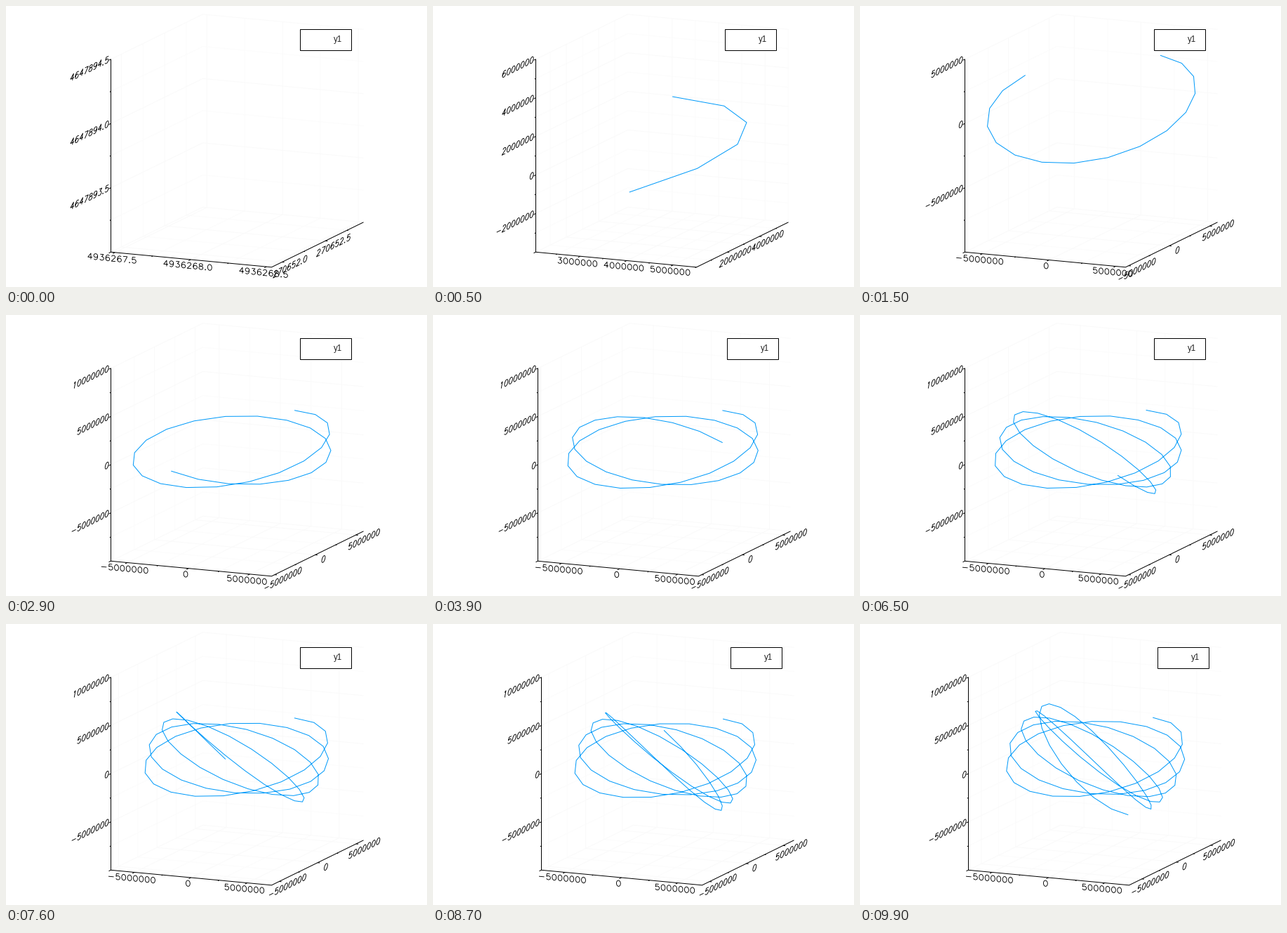
These frames come from a looping animation (600 px wide and 400 px high, 10 s). A matplotlib script:

```python
import numpy as np
import matplotlib.pyplot as plt
from matplotlib.animation import FuncAnimation
from matplotlib.collections import LineCollection
from matplotlib.patches import Rectangle

N = 100            # one more orbit sample per frame
STEP = 300         # seconds between samples
PX = 0.72          # one pixel in points at 100 dpi

# Circular orbit seen from the rotating Earth
START = np.array([4936268.004, 270652.41, 4647893.75])
INC = np.radians(51.64)
MOTION = np.radians(0.06461)                 # along the orbit, per second
DRIFT = np.radians(0.0041781 + 0.0000573)    # Earth spin plus node precession


def orbit():
    r = np.linalg.norm(START)
    t = np.arange(N) * STEP
    u = np.pi - np.arcsin(START[2] / (r * np.sin(INC))) + MOTION * t
    a, b = np.cos(u), np.sin(u) * np.cos(INC)
    node = np.arctan2(START[1], START[0]) - np.arctan2(b[0], a[0])
    lon = np.arctan2(b, a) + node - DRIFT * t
    rho = r * np.hypot(a, b)
    return np.column_stack([rho * np.cos(lon), rho * np.sin(lon),
                            r * np.sin(u) * np.sin(INC)])


PATH = orbit()

# Affine view of the unit cube, in pixels
ORIGIN = np.array([149, 349.8])
VIEW = np.array([[229, 21.5], [131, -64], [0, -274.5]])


# Stroke font on a 20 x 21 cell
def arc(cx, cy, rx, ry, a0, a1):
    a = np.radians(np.linspace(a0, a1, 20))
    return np.column_stack([cx + rx * np.cos(a), cy + ry * np.sin(a)])


def join(*parts):
    return np.vstack([np.atleast_2d(p) for p in parts]).astype(float)


SIX = join(arc(11.5, 10, 7.5, 11, 50, 180), arc(10.5, 6.5, 6.5, 6.5, 180, 540))
GLYPHS = {
    "0": [arc(10, 10.5, 7, 10.5, 0, 360)],
    "1": [join([(6, 17), (8, 18), (11, 21), (11, 0)])],
    "2": [join(arc(10, 15.5, 6, 5.5, 170, -25), [(3, 0), (17, 0)])],
    "3": [join([(5, 21), (16, 21), (10, 13)], arc(10, 6.5, 7, 6.5, 90, -155))],
    "4": [join([(13, 0), (13, 21), (3, 7), (18, 7)])],
    "5": [join([(15, 21), (5, 21), (4, 12)], arc(10, 7, 7, 7, 140, -155))],
    "6": [SIX],
    "7": [join([(3, 21), (17, 21), (7, 0)])],
    "8": [arc(10, 16.5, 6, 4.5, 0, 360), arc(10, 6, 7, 6, 0, 360)],
    "9": [np.array([20, 21]) - SIX],
    "-": [join([(4, 9), (22, 9)])],
    ".": [arc(5, 1, 1, 1, 0, 360)],
}
WIDTH = {"-": 26, ".": 10}
FLAT = np.array([[0.4175, 0.0392], [0, -0.4]])
TILTED = np.array([[0.328, -0.163], [0.08, -0.46]])


def label(text, at, basis, align):
    """Strokes of a text whose middle line passes through `at`."""
    widths = [WIDTH.get(c, 20) for c in text]
    x = -align * sum(widths)
    out = []
    for c, w in zip(text, widths):
        out += [(g + (x, -10.5)) @ basis + at for g in GLYPHS[c]]
        x += w
    return out


# Tick vector, label offset, label basis and label alignment of x, y, z
AXES = [
    ((-3, 1.5), (-4.1, 8.2), FLAT, 0.5),
    ((3.2, 0.3), (11.8, 6), TILTED, 0.5),
    ((-3, 1.4), (-2.5, -0.4), TILTED, 1.0),
]


def tick_size(lo, hi):
    e = np.log10(hi - lo)
    n = np.floor(e)
    f = 10 ** (e - n)
    unit = 2 if f > 5 else 1 if f > 2.5 else 0.5 if f > 1 else 0.2
    return unit * 10 ** n


def limits(pts):
    lo, hi = pts.min(0), pts.max(0)
    if len(pts) == 1:
        lo, hi = lo - 0.5, hi + 0.5
    pad = 0.03 * (hi - lo)
    lo, hi = lo - pad, hi + pad
    step = tick_size(lo[2], hi[2])
    lo[2] = np.floor(lo[2] / step) * step
    hi[2] = np.ceil(hi[2] / step) * step
    return lo, hi


def left_shift(n, lo, hi):
    """Left margin follows the width of the depth labels."""
    if hi[1] > 6.02e6:
        return 5
    return -3 if n and lo[1] > -2e6 else 0


def rail(k, s):
    """Tick position on axis k, then its grid line across floor and walls."""
    return [[(s, 0, 0), (s, 1, 0), (s, 1, 1)],
            [(1, s, 0), (0, s, 0), (0, s, 1)],
            [(0, 0, s), (0, 1, s), (1, 1, s)]][k]


fig = plt.figure(figsize=(6, 4), dpi=100, facecolor="white")
ax = fig.add_axes([0, 0, 1, 1])
ax.set_xlim(-0.5, 599.5)
ax.set_ylim(399.5, -0.5)
ax.axis("off")


def strokes_layer(color, width, z):
    lines = LineCollection([], colors=color, linewidths=width * PX, zorder=z)
    return ax.add_collection(lines, autolim=False)


minor_grid = strokes_layer("0.99", 1, 0)
grid = strokes_layer("0.98", 1, 1)
frame = strokes_layer("black", 1, 2)
text = strokes_layer("black", 0.9, 3)
curve, = ax.plot([], [], color="#009afa", lw=PX, zorder=4)
box = Rectangle((418, 32), 73, 30, fc="white", ec="black", lw=PX, zorder=5)
ax.add_patch(box)
name = ax.text(466.5, 48, "y1", family="Liberation Sans", size=8.3,
               color="#222222", va="center", zorder=6)


def draw(n):
    pts = PATH[:n + 1]
    lo, hi = limits(pts)
    shift = left_shift(n, lo, hi)
    origin = ORIGIN + (shift, 0)

    def project(p):
        return origin + np.asarray(p, float) @ VIEW

    edges = [project([(0, 0, 1), (0, 0, 0), (1, 0, 0), (1, 1, 0)])]
    major_rails, minor_rails, strokes = [], [], []
    for k, (tick, offset, basis, align) in enumerate(AXES):
        step = tick_size(lo[k], hi[k])
        half = step / 2
        first = int(np.ceil(lo[k] / half - 1e-6))
        last = int(np.floor(hi[k] / half + 1e-6))
        for i in range(first, last + 1):
            s = (i * half - lo[k]) / (hi[k] - lo[k])
            line = project(rail(k, s))
            at = line[0]
            major = i % 2 == 0
            edges.append([at, at + np.array(tick) * (1 if major else 0.55)])
            (major_rails if major else minor_rails).append(line)
            if major and s > 1e-6:
                value = f"{i * half:.{1 if step < 1 else 0}f}"
                strokes += label(value, at + offset, basis, align)

    minor_grid.set_segments(minor_rails)
    grid.set_segments(major_rails)
    frame.set_segments(edges)
    text.set_segments(strokes)
    xy = project((pts - lo) / (hi - lo))
    curve.set_data(xy[:, 0], xy[:, 1])
    curve.set_visible(n > 0)
    box.set_x(418 + shift)
    name.set_x(466.5 + shift)
    return minor_grid, grid, frame, text, curve, box, name


anim = FuncAnimation(fig, draw, frames=N, interval=100, repeat=True,
                     repeat_delay=0, blit=False)
plt.show()
```
